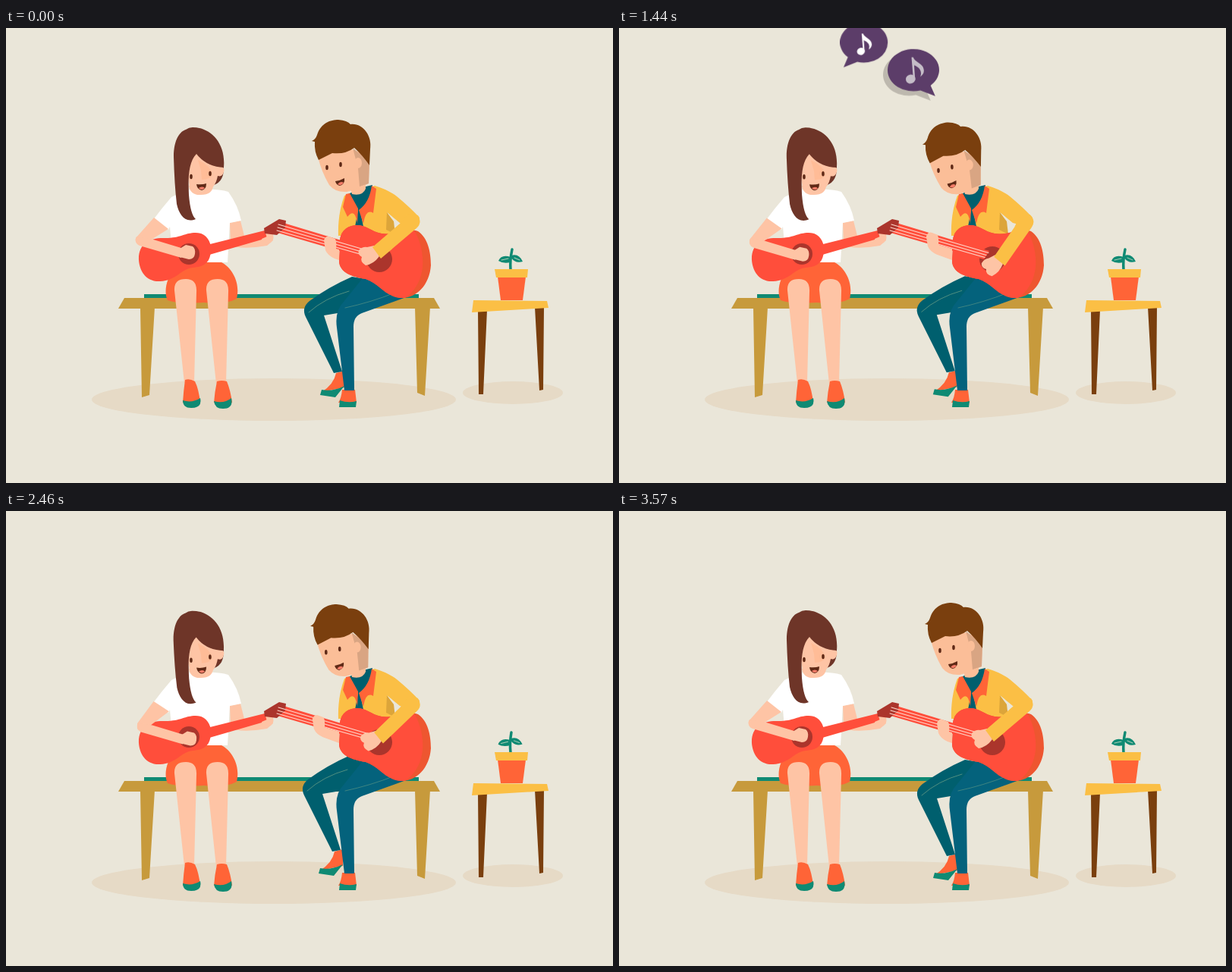
Animation of 800 by 600 pixels, one loop 3.6 s. Source, as an HTML page without scripts:

```html
<!DOCTYPE html>
<html lang="en">
<head>
<meta charset="utf-8">
<title>Guitar duet</title>
<style>
  /* --m runs from 0 (rest) to 1 (full pose) and drives each moving part */
  @property --m { syntax: "<number>"; inherits: true; initial-value: 0; }
  html, body { margin: 0; width: 100%; height: 100%; overflow: hidden; background: #eae6d9; }
  svg { display: block; width: 800px; height: 600px; }

  .skin { fill: #fec4a5; } .tan { fill: #fbbe98; } .white { fill: #fff; } .coral { fill: #ff6437; }
  .red { fill: #ff4e3b; } .wine { fill: #ab352c; } .green { fill: #0f8a73; }
  .teal { fill: #005f6e; } .denim { fill: #04627c; } .yellow { fill: #fbbf45; } .wood { fill: #c79a3c; }
  .brown { fill: #7a3f0e; } .auburn { fill: #6e3528; } .ground { fill: #e6dac6; }
  .purple { fill: #5c3d69; } .dark { fill: #5f2a17; }
  .line { fill: none; stroke-linecap: round; }

  .girl-head, .girl-arm, .boy-head, .boy-strum, .boy-fret, .tap, .plant, .pop, .rise {
    animation: 3.6s ease-in-out infinite;
  }
  .girl-head { animation-name: girl-nod; transform-origin: 257px 200px;
    transform: translateY(calc(var(--m) * 2px)) rotate(calc(var(--m) * -2.3deg)); }
  .girl-arm { animation-name: girl-strum; }
  .girl-upper { transform-origin: 205px 255px; transform: rotate(calc(var(--m) * -8deg)); }
  .girl-fore { transform: translate(calc(var(--m) * 3px), calc(var(--m) * 7px)); }
  .boy-head { animation-name: beat; animation-duration: .9s; transform-origin: 440px 180px;
    transform: translate(calc(var(--m) * -2.3px), calc(var(--m) * 3.6px)) rotate(calc(var(--m) * -2deg)); }
  .boy-strum { animation-name: boy-strum; transform-origin: 538px 252px;
    transform: rotate(calc(var(--m) * -16deg)); }
  .boy-fret { animation-name: slide; transform: translate(calc(var(--m) * -16px), calc(var(--m) * -6px)); }
  .tap { animation-name: tap; animation-duration: .45s;
    transform: translate(calc(var(--m) * -2px), calc(var(--m) * -6px)); }
  .plant { animation-name: sway; transform-origin: 666px 318px; transform: rotate(calc(var(--m) * -3deg)); }

  .pop { animation-name: pop-left; transform-origin: -28px 34px; animation-timing-function: ease-out; }
  .rise { animation-name: rise-left; animation-timing-function: cubic-bezier(.333, 0, .667, .333); }
  .right .pop { animation-name: pop-right; transform-origin: 29px 34px; }
  .right .rise { animation-name: rise-right; }

  @keyframes beat { 0%, 100% { --m: 0; } 50% { --m: 1; } }
  @keyframes tap { 0%, 12%, 78%, 100% { --m: 0; } 47% { --m: 1; } }
  @keyframes girl-nod {
    0%, 100% { --m: 0; } 20% { --m: 1; } 38% { --m: .1; }
    54% { --m: .9; } 66% { --m: .25; } 85% { --m: 1; }
  }
  @keyframes girl-strum {
    0%, 16.7%, 33.3%, 99%, 100% { --m: 0; } 8.3%, 25%, 91.7% { --m: 1; }
    40% { --m: .4; } 51.7% { --m: .9; } 60% { --m: .2; } 68.3% { --m: .65; }
    76.7% { --m: .1; } 85% { --m: .5; }
  }
  @keyframes boy-strum {
    0%, 16.7%, 33.3%, 60%, 83.3%, 99%, 100% { --m: 0; } 8.3%, 25%, 41.7%, 75%, 91.7% { --m: 1; }
    46.7% { --m: .2; } 52.5% { --m: .9; } 68.3% { --m: .2; }
  }
  @keyframes slide {
    0%, 99%, 100% { --m: 0; } 25% { --m: .75; } 40% { --m: .88; }
    51.7% { --m: .5; } 68.3% { --m: .95; } 85% { --m: 1; }
  }
  @keyframes sway { 0%, 15%, 60%, 100% { --m: 0; } 7.5%, 73%, 93% { --m: 1; } 83% { --m: -.3; } }
  @keyframes pop-left { 0%, 12% { transform: scale(0); } 19.5%, 100% { transform: none; } }
  @keyframes pop-right { 0%, 15% { transform: scale(0); } 22%, 100% { transform: none; } }
  @keyframes rise-left {
    0%, 19.7% { transform: none; } 50%, 100% { transform: translate(-3px, -153px) scale(.9); }
  }
  @keyframes rise-right { 0%, 22.2% { transform: none; } 60%, 100% { transform: translateY(-153px); } }
</style>
</head>
<body>
<svg viewBox="0 0 800 600">
  <defs>
    <path id="balloon" d="M33 0A33 27.5 0 0 1-9 26.5L-28 34L-22 20A33 27.5 0 1 1 33 0Z"/>
    <g id="note">
      <ellipse cx="-4" cy="11.500" rx="5.500" ry="5" transform="rotate(-20 -4 11.500)"/>
      <path d="M-1 11L-3-13H-1C1-7 11-6 11 2Q11 6 7 9Q10 0 0-4L1 11Z"/>
    </g>
    <clipPath id="fret-clip"><path d="M380 250H441L439 290V340H380Z"/></clipPath>
  </defs>

  <rect width="800" height="600" fill="#eae6d9"/>
  <ellipse class="ground" cx="353" cy="490" rx="240" ry="28"/>
  <ellipse class="ground" cx="668" cy="481" rx="66" ry="15"/>

  <g id="bench">
    <path class="wood" d="M177 368H196L189 484L179 487ZM539 368H559L552 485L542 481Z"/>
    <path class="wood" d="M156 356H564L572 370H148Z"/>
    <path class="green" d="M182 351H544V356H182Z"/>
  </g>

  <g id="table">
    <path class="brown" d="M622 372H634L629 483H623ZM697 368H709L708 477L703 478Z"/>
    <path class="yellow" d="M616 359L713 360L715 369L614 375Z"/>
    <g class="plant">
      <path class="line" d="M665 319Q664 306 667 292" stroke="#0f8a73" stroke-width="3.500"/>
      <path class="green" d="M665 309Q655 311 649 307Q653 298 665 302ZM666 300Q676 297 681 308Q671 311 666 303Z"/>
      <path class="line" d="M653 306L662 304M670 303L677 306" stroke="#a9cdb4"/>
    </g>
    <path class="coral" d="M648 328H685L681 359H652Z"/>
    <path class="yellow" d="M644 318H688L687 329H646Z"/>
  </g>

  <g id="girl">
    <path class="coral" d="M225 316C210 328 208 350 213 359Q225 364 260 362Q290 365 304 357C309 337 299 317 284 309Q250 307 225 316Z"/>
    <path class="skin" d="M222 346Q221 331 237 331Q252 331 251 348L248 468H235ZM264 346Q263 331 279 331Q294 331 293 348L290 469H277Z"/>
    <path class="coral" d="M236 464Q234 478 233 494H256Q254 476 249 466Q242 462 236 464ZM278 466Q275 480 274 494H298Q296 478 291 466Q284 464 278 466Z"/>
    <path class="green" d="M233 491Q245 495 256 488Q259 501 244 501Q233 501 233 491ZM274 492Q287 496 297 488Q300 502 286 502Q275 502 274 492Z"/>
    <path class="skin" d="M295 257L309 254L314 274L352 270V280L344 287Q322 291 304 289L296 284Z"/>
    <path class="white" d="M243 213Q228 218 218 223Q205 238 194 253L214 266L216 262L218 285L240 309H292L295 257L310 254Q306 234 293 216Q280 211 243 213Z"/>
    <path class="skin" d="M241 208H273Q272 220 257 220Q243 221 241 208Z"/>
    <g class="girl-head">
      <path class="auburn" d="M287 182Q288 202 274 207L265 195Z"/>
      <path class="skin" d="M238 165H275L283 182Q289 184 287 190Q285 197 279 195Q276 211 265 215Q250 220 242 209Q238 190 238 165Z"/>
      <path fill="#ffba94" d="M253 174Q269 181 272 193Q269 200 258 200L257 188Z" opacity=".8"/>
      <path class="auburn" d="M246 131C268 131 290 150 287 184Q264 183 251 166C240 177 240 200 241 220Q243 246 250 252C236 258 228 246 225 232Q222 206 221 170C221 146 230 136 237 134Q241 131 246 131Z"/>
      <ellipse class="dark" cx="244" cy="196" rx="1.800" ry="3.200"/>
      <ellipse class="dark" cx="269" cy="192" rx="1.800" ry="3.200"/>
      <path class="dark" d="M251 206Q258 207 264 205Q264 213 258 214Q252 213 251 206Z"/>
      <path d="M254 211Q258 208 262 211Q258 215 254 211Z" fill="#f47c68"/>
    </g>
    <path class="red" d="M175 306C174 284 190 276 210 277C230 277 236 270 250 270C264 270 271 282 270 294C269 312 258 315 246 316C230 318 225 333 203 334C184 335 176 320 175 306Z"/>
    <circle class="wine" cx="241" cy="298" r="14"/>
    <path class="red" d="M265 286L341 267L344 277L268 299Z"/>
    <path class="skin" d="M344 275L351 270Q355 277 349 283L339 287L337 278Z"/>
    <g class="girl-arm">
      <path class="skin girl-upper" d="M195 250L171 277Q169 286 180 287L190 280L214 265Z"/>
      <g class="skin girl-fore">
        <path d="M172 275Q168 283 176 287L231 303L234 291L191 278Z"/>
        <path d="M229 291L237 286L246 288Q250 291 249 298Q248 305 241 305L229 302Z"/>
      </g>
    </g>
  </g>

  <g id="boy">
    <g class="tap">
      <path class="coral" d="M435 455L446 452V474L416 480Q432 470 435 455Z"/>
      <path class="green" d="M416 477Q430 480 446 472L434 487L414 484Z"/>
      <path class="teal" d="M456 328L500 335L470 374L437 376L419 379L443 453L432 455L395 381Q389 369 400 360Q426 341 456 328Z"/>
      <path class="line" d="M399 375Q420 356 452 347" stroke="#659b85" stroke-width=".8"/>
    </g>
    <path class="coral" d="M443 477H460L462 494H438Q442 488 443 477Z"/>
    <path class="green" d="M440 491Q451 495 462 492L461 500H439Z"/>
    <path class="denim" d="M474 325L530 354L469 376Q458 380 458 394L459 478H446L436 395Q433 373 445 361Z"/>
    <path class="line" d="M447 369Q480 362 513 349" stroke="#659b85" stroke-width=".6"/>

    <path class="yellow" d="M446 221L486 208Q503 213 515 222Q532 236 545 250L538 262L519 257L502 243L513 274H438Q437 245 446 221Z"/>
    <path fill="#dca53a" d="M502 243L511 255L513 272L501 266Z"/>
    <path class="teal" d="M451 219L470 210L483 207L479 230L467 242L471 262H460L464 240Z"/>
    <path class="coral" d="M448 219L453 218L464 238L463 258Q460 236 450 249L444 236ZM482 208L488 212L484 244Q474 238 471 258L465 240Q479 230 482 208Z"/>
    <path class="tan" d="M452 204H474V212Q470 222 456 219Z"/>
    <g class="boy-head">
      <path class="tan" d="M411 170L440 155L479 168L478 205Q462 213 449 216Q434 217 426 207Q416 190 411 170Z"/>
      <path fill="#d9a583" d="M457 158L479 177L478 205L466 209L464 185Z"/>
      <ellipse class="tan" cx="464" cy="178" rx="5" ry="7"/>
      <path class="brown" d="M403 149Q408 147 410 141C415 125 428 121 438 121Q450 122 454 127C470 125 483 142 480 160L479 181Q470 168 459 158Q447 167 430 165L412 174Q406 163 407 150Z"/>
      <ellipse class="dark" cx="423" cy="184" rx="1.800" ry="3.200"/>
      <ellipse class="dark" cx="441" cy="180" rx="1.800" ry="3.200"/>
      <path class="dark" d="M434 202Q441 201 446 198Q447 206 440 208Q435 207 434 202Z"/>
      <path d="M437 206Q441 201 445 204Q442 209 437 206Z" fill="#f47c68"/>
    </g>

    <path fill="#ee5630" d="M440 290C438 272 445 262 460 260C475 259 480 268 495 271C515 274 528 262 543 268C556 277 560 295 560 313C558 340 540 357 520 356C500 354 494 338 474 331C455 328 440 322 439 308Z"/>
    <path class="red" d="M440 290C438 272 445 262 460 260C475 259 480 268 495 271C513 274 526 264 538 267C551 288 559 333 526 356C500 357 494 338 474 331C455 328 440 322 439 308Z"/>
    <circle class="wine" cx="492" cy="305" r="17"/>
    <path class="red" d="M361 257L369 258L488 294L481 305L440 294L358 270Z"/>
    <path class="wine" d="M340 264L360 252L369 254L368 263L357 273L341 271Z"/>
    <path class="line" d="M359 259L487 296.500M358 263L484 299.500M357 267L482 302.500" stroke="#ffd6ca" stroke-width="1.100"/>
    <g clip-path="url(#fret-clip)">
      <path class="skin boy-fret" d="M419 280Q421 274 426 275L434 278Q436 283 435 291L472 302V318L433 304Q424 300 421 293Z"/>
    </g>
    <g class="boy-strum">
      <path class="skin" d="M465 293Q470 288 476 289L485 287L492 301Q485 311 474 313Q466 308 469 302Q463 299 465 293Z"/>
      <path class="yellow" d="M543 247Q549 257 541 264L494 304L483 289L519 258L530 245Z"/>
    </g>
  </g>

  <g transform="translate(324 88.700)">
    <g class="rise"><g class="pop">
      <use href="#balloon" y="-.5" class="purple"/>
      <use href="#note" class="white"/>
    </g></g>
  </g>
  <g class="right" transform="translate(388 89.800)">
    <g class="rise"><g class="pop">
      <use href="#balloon" transform="translate(-6 6) scale(-1.030 1)" fill="#bdb8ae"/>
      <use href="#balloon" transform="scale(-1.030 1)" class="purple"/>
      <use href="#note" transform="translate(1 -2) scale(1.170)" fill="#c5bdc8"/>
    </g></g>
  </g>
</svg>
</body>
</html>
```
